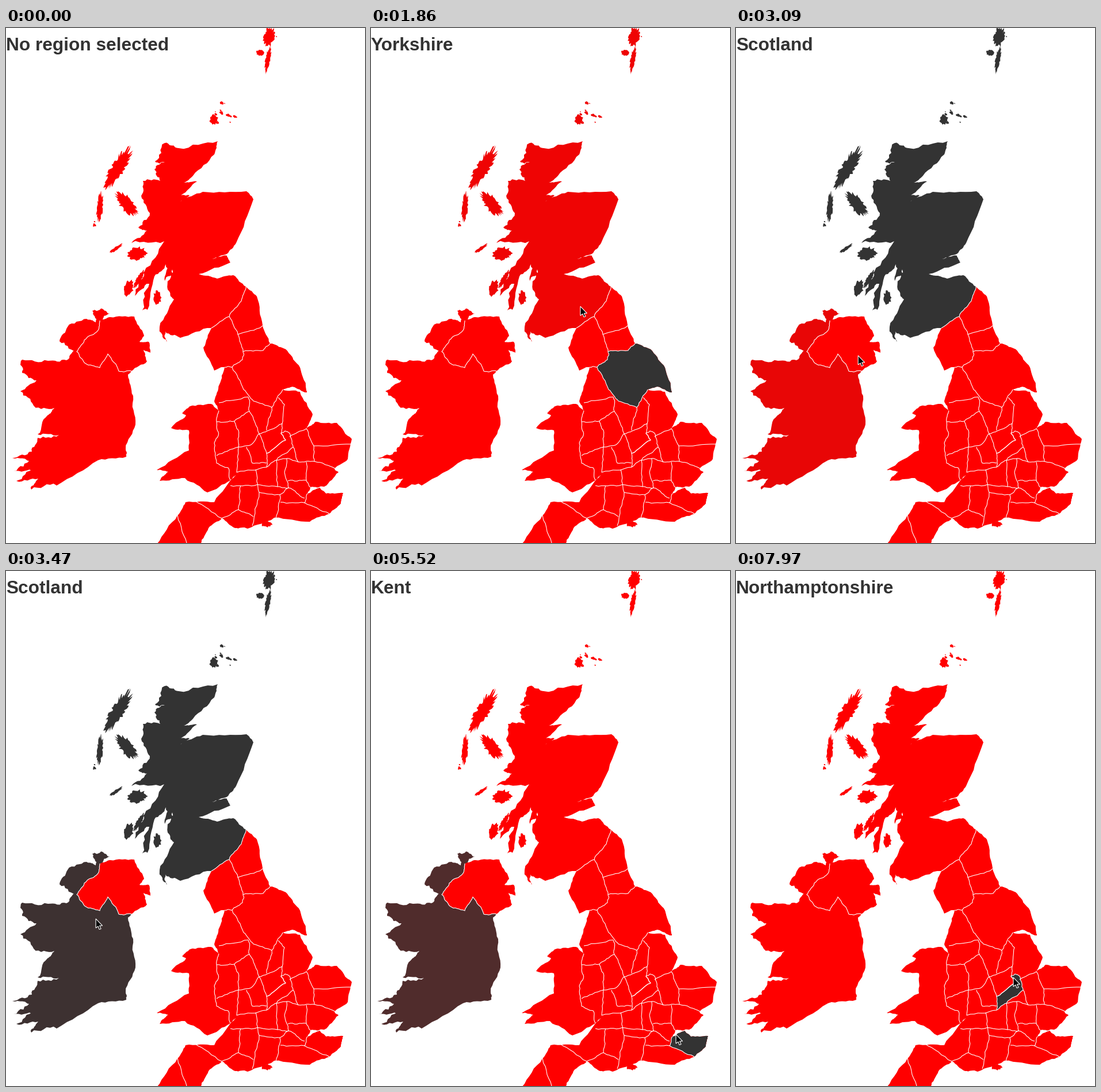
Animation, 624 px wide and 896 px high, one loop 8000 ms. Source, as a matplotlib script:

```python
import numpy as np
import matplotlib.pyplot as plt
from matplotlib.animation import FuncAnimation
from matplotlib.collections import LineCollection, PolyCollection

W, H, DPI = 624, 896, 64
PX = 72 / DPI
STEP, LOOP = 40, 8000
RED, DARK = np.array([1, 0, 0]), np.array([.2, .2, .2])


def split(a, b, rng, amp, depth):
    if depth == 0:
        return [a]
    d = b - a
    size = np.hypot(*d) + 1e-6
    push = rng.uniform(-1, 1) * min(amp * size, 12 * amp)
    mid = (a + b) / 2 + np.array([-d[1], d[0]]) / size * push
    return split(a, mid, rng, amp, depth - 1) + split(mid, b, rng, amp, depth - 1)


def path(*xy, amp=.12, depth=3):
    """Polyline with seeded roughness that depends only on each segment."""
    pts = np.array(xy, float).reshape(-1, 2)
    out = []
    for a, b in zip(pts, pts[1:]):
        flip = tuple(a) > tuple(b)
        p, q = (b, a) if flip else (a, b)
        rng = np.random.default_rng([int(v) for v in (*p, *q)])
        seg = split(p, q, rng, amp, depth) + [q]
        out += (seg[::-1] if flip else seg)[:-1]
    return np.array(out + [pts[-1]])


def coast(*xy):
    return path(*xy, amp=.25)


def ring(*arcs):
    return np.concatenate(arcs)


def isle(x, y, a, b, tilt=0):
    """Ragged ellipse."""
    rng = np.random.default_rng(int(x + y))
    n = 6 + 2 * int(a)
    u = np.arange(n) * 2 * np.pi / n
    k = rng.uniform(.75, 1.2, n)
    z = (a * k * np.cos(u) + 1j * b * k * np.sin(u)) * np.exp(1j * np.radians(tilt))
    return np.c_[x + z.real, y + z.imag]


def scatter(x, y, spread, n):
    rng = np.random.default_rng(n)
    return [isle(*rng.normal((x, y), spread), r, r * .7, 40)
            for r in rng.uniform(1, 3.5, n)]


# Scotland
border = path(417, 450, 409, 475, 388, 502, 357, 522)
west = coast(
    357, 522, 303, 539, 277, 528, 280, 546, 267, 520, 292, 472, 281, 455, 289, 420,
    276, 440, 278, 411, 258, 432, 246, 490, 237, 491, 249, 445, 224, 466, 240, 425,
    275, 371, 218, 374, 245, 352, 230, 347, 250, 322, 235, 292, 238, 266, 268, 266,
    258, 246, 276, 234, 259, 232, 276, 200, 300, 209, 368, 197)
east = path(
    368, 197, 362, 220, 325, 257, 309, 269, 332, 267, 304, 291, 319, 291, 303, 302,
    342, 285, 418, 284, 430, 298, 400, 374, 384, 393, 358, 402, 384, 396, 390, 408,
    335, 428, 367, 436, 395, 430, 417, 450)
scotland = [ring(west, east, border)] + [isle(*i) for i in (
    (457, 15, 17, 9, 100), (455, 55, 22, 4, 100), (442, 43, 7, 5),
    (195, 243, 38, 11, 121), (163, 312, 24, 5, 95), (210, 306, 25, 11, 50),
    (228, 392, 16, 11), (213, 453, 14, 8, 105), (231, 437, 17, 4, 120),
    (263, 469, 7, 11), (361, 159, 7, 9), (191, 384, 13, 3, 145))]
scotland += scatter(382, 148, 11, 15) + scatter(469, 7, 5, 4) + scatter(155, 347, 5, 3)

# Ireland
ni_border = path(163, 509, 160, 526, 136, 543, 123, 563, 137, 583, 163, 591, 177, 567,
                 196, 597, 218, 597)
ni_coast = path(218, 597, 245, 580, 239, 560, 251, 565, 248, 546, 232, 546, 240, 535,
                223, 502, 181, 503, 163, 509)
ire_east = path(218, 597, 212, 603, 221, 640, 225, 690, 208, 732, 209, 746, 160, 752,
                88, 796)
ire_west = coast(
    88, 796, 44, 803, 56, 784, 18, 788, 50, 768, 13, 771, 46, 752, 11, 748, 45, 737,
    55, 713, 92, 708, 55, 707, 72, 674, 84, 661, 48, 657, 25, 632, 53, 613, 28, 600,
    28, 577, 73, 579, 105, 578, 122, 561, 93, 545, 107, 520, 140, 506, 156, 512,
    150, 492, 165, 488, 181, 497, 163, 509)

# Wales
wales_coast = path(
    370, 666, 356, 654, 320, 658, 306, 670, 313, 674, 287, 696, 318, 700, 318, 735,
    262, 769, 282, 772, 267, 788, 311, 783, 350, 808, 390, 787)
wales_border = path(390, 787, 386, 765, 366, 757, 362, 722, 369, 709, 366, 685, 370, 666)

# England
tyne = path(417, 450, 436, 467, 446, 517, 459, 549)
york_coast = path(459, 549, 489, 562, 511, 591, 523, 634, 498, 624, 481, 629)
york_border = path(481, 629, 462, 660, 430, 649, 413, 629, 393, 590, 411, 577,
                   412, 563, 447, 561, 459, 549)
anglia = path(481, 629, 511, 633, 533, 672, 522, 697, 538, 685, 575, 687, 601, 715,
              594, 750, 571, 767, 578, 773, 553, 798, 529, 799, 524, 810)
kent_coast = path(524, 810, 545, 800, 556, 810, 586, 809, 582, 827, 562, 845)
kent_border = path(562, 845, 519, 826, 524, 810)
south = path(562, 845, 528, 859, 466, 852, 420, 871, 398, 870, 375, 853, 352, 870,
             338, 898, 262, 898)
severn = path(262, 898, 298, 848, 312, 825, 362, 825, 401, 776, 390, 787)
lancs = path(370, 666, 362, 649, 371, 620, 380, 590, 362, 596, 343, 556, 357, 522)
england = [ring(tyne, york_coast, anglia, kent_coast, south, severn, wales_border,
                lancs, border[::-1]), isle(453, 863, 10, 5)]
rutland = path(453, 740, 486, 717, 478, 705)
northants = [ring(rutland, path(478, 705, 485, 701, 493, 705, 499, 729, 470, 752,
                                453, 764, 453, 740))]
leics = [ring(rutland, path(478, 705, 480, 688, 462, 698, 440, 706, 453, 740))]
bucks = [path(470, 752, 488, 749, 485, 769, 491, 800, 472, 798, 470, 752)]

counties = [path(*c) for c in (
    (388, 502, 403, 533, 446, 518),
    (403, 533, 412, 563),
    (393, 590, 380, 590),
    (370, 652, 421, 642, 423, 667, 440, 706),
    (423, 667, 397, 684, 366, 685),
    (462, 660, 453, 700),
    (473, 643, 484, 655, 480, 688),
    (397, 684, 404, 700, 404, 729, 426, 725, 440, 706),
    (366, 744, 404, 729, 401, 773, 453, 764),
    (418, 729, 428, 757, 453, 757),
    (390, 796, 432, 796, 472, 798),
    (434, 768, 440, 808, 428, 866),
    (328, 822, 375, 853, 404, 838, 408, 796),
    (404, 838, 430, 850),
    (440, 808, 476, 812, 491, 800, 519, 818),
    (476, 812, 469, 853),
    (477, 825, 519, 826),
    (490, 788, 522, 787, 529, 799),
    (493, 711, 522, 697, 535, 727, 600, 724),
    (535, 727, 536, 754, 573, 767),
    (499, 729, 508, 755, 536, 754),
    (488, 749, 508, 755),
    (522, 755, 522, 787),
    (297, 842, 314, 896),
)]

# Shapes with pairs of time and darkness
REGIONS = [
    (england, ()),
    ([ring(ni_coast, ni_border)], ()),
    (scotland, (1810, 0, 2260, 1, 3780, 1, 4540, 0)),
    ([ring(ire_east, ire_west, ni_border)], (3040, 0, 3480, .955, 5450, .955, 6210, 0)),
    ([ring(wales_coast, wales_border)], (4560, 0, 4760, .15, 5100, 0)),
    ([ring(york_coast, york_border)], (350, 0, 880, 1, 2280, 1, 3040, 0)),
    ([ring(kent_coast, kent_border)], (4900, 0, 5290, 1, 7040, 1, 7850, 0)),
    (bucks, (6340, 0, 6500, .14, 6900, 0)),
    (leics, (7120, 0, 7350, .2, 7800, 0)),
    (northants, (6560, 0, 7000, 1)),
]
TITLES = [(0, "No region selected"), (1040, "Yorkshire"), (2300, "Scotland"),
          (3780, "Ireland"), (5440, "Kent"), (7030, "Northamptonshire")]
MOVES = np.array([
    (130, 524, 860), (520, 462, 625), (900, 436, 572), (1470, 436, 572),
    (1860, 362, 482), (2230, 345, 457), (2400, 345, 457), (3040, 220, 565),
    (3470, 153, 607), (3760, 153, 607), (4550, 300, 722), (5290, 530, 806),
    (6200, 530, 806), (6440, 474, 755), (7050, 470, 740), (7300, 466, 716),
    (7900, 482, 707)], float)
ARROW = np.array([(0, 0), (0, 16), (4, 13), (6, 18.5), (9, 17.5), (6.5, 12), (11.5, 12)])


def ease(k):
    """CSS ease, the curve through (.25, .1) and (.25, 1)."""
    s = np.linspace(0, 1, 60)
    r = 1 - s
    x = .75 * s * r * r + .75 * s * s * r + s ** 3
    y = .3 * s * r * r + 3 * s * s * r + s ** 3
    return np.interp(k, x, y)


def level(t, keys):
    if not keys or t <= keys[0]:
        return 0
    ts, vs = keys[::2], keys[1::2]
    if t >= ts[-1]:
        return vs[-1]
    i = np.searchsorted(ts, t) - 1
    return vs[i] + (vs[i + 1] - vs[i]) * ease((t - ts[i]) / (ts[i + 1] - ts[i]))


fig = plt.figure(figsize=(W / DPI, H / DPI), dpi=DPI, facecolor="white")
ax = fig.add_axes([0, 0, 1, 1])
ax.set(xlim=(0, W), ylim=(H, 0))
ax.axis("off")

shapes = [(ax.add_collection(PolyCollection(polys, facecolor=RED, edgecolor="none")), keys)
          for polys, keys in REGIONS]
lines = counties + [border, ni_border, wales_border, york_border, kent_border]
lines += northants + leics + bucks
ax.add_collection(LineCollection(lines, colors="white", linewidths=1.1 * PX, zorder=3))
title = ax.text(0, 39, "", family="Liberation Sans", weight="bold", size=31.6 * PX,
                color="#333333", va="baseline", zorder=4)
cursor = ax.fill(*ARROW.T, fc="black", ec="white", lw=1.1 * PX, zorder=5)[0]


def draw(i):
    t = i * STEP + 10
    for shape, keys in shapes:
        shape.set_facecolor(RED + (DARK - RED) * level(t, keys))
    title.set_text([name for start, name in TITLES if start <= t][-1])
    tip = [np.interp(t, MOVES[:, 0], MOVES[:, k]) for k in (1, 2)]
    cursor.set_xy(ARROW + tip)
    cursor.set_visible(t >= MOVES[0, 0])
    return [shape for shape, _ in shapes] + [title, cursor]


anim = FuncAnimation(fig, draw, frames=LOOP // STEP, interval=STEP, repeat=True,
                     repeat_delay=0, blit=False)
plt.show()
```
